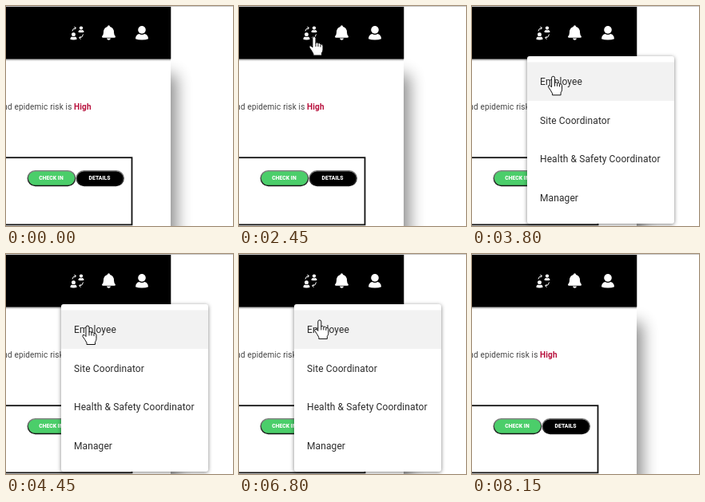
Write an HTML page that moves like this. It is 284 by 276 pixels and loops after 9150 ms.

```html
<!DOCTYPE html>
<html lang="en">
<meta charset="utf-8">
<title>Role menu</title>
<style>
  html, body { margin: 0; height: 100%; overflow: hidden; background: #fff }
  svg { display: block; font-family: Roboto, sans-serif }
  .copy { font-size: 10px; letter-spacing: .17px; fill: #444 }
  .copy .risk { font-weight: 700; fill: #b8103c }
  .pill { font-size: 6.8px; font-weight: 900; fill: #fff; text-anchor: middle }
  #menu { filter: drop-shadow(0 1px 2.5px rgba(0, 0, 0, .5)) }
  #items { font-size: 12px; letter-spacing: .1px; fill: #2b2b2b }
  .cursor { fill: #fff; stroke: #111; stroke-width: 1; stroke-linejoin: round }
</style>
<svg width="284" height="276" viewBox="0 0 284 276">
  <defs>
    <filter id="blur" x="-20%" y="-20%" width="140%" height="140%"><feGaussianBlur stdDeviation="10"/></filter>
    <linearGradient id="edge" x2="0" y2="1"><stop stop-color="#999"/><stop offset="1" stop-color="#fff"/></linearGradient>
    <linearGradient id="rim" x2="0" y2="1"><stop stop-color="#888"/><stop offset="1" stop-color="#111"/></linearGradient>
    <g id="person">
      <circle cy="-3.800" r="4.800"/>
      <path d="M-8 7.500Q-8 2.500-3.500 1.300Q0 3.500 3.500 1.300Q8 2.500 8 7.500Q5 8.800 0 8.800Q-5 8.800-8 7.500Z"/>
    </g>
  </defs>

  <rect x="-60" y="86" width="273" height="260" opacity=".46" filter="url(#blur)"/>
  <path d="M0 66H206V276H0Z" fill="#fff"/>
  <path d="M0 66H206V69.500H0Z" fill="url(#edge)"/>
  <path d="M0 1H206.300V66.500H0Z"/>
  <path d="M0 .5H284" stroke="#c8c8c8"/>

  <g fill="#fff">
    <use href="#person" transform="translate(84.500 37.800) scale(.52)"/>
    <use href="#person" transform="translate(94 29.300) scale(.45)"/>
    <g fill="none" stroke="#fff">
      <path d="M83 31.500Q83.500 28 87 27.500M85.500 26L87.500 27.500L86 29.500"/>
      <path d="M96.500 35.500Q96 39.500 92 40M93.500 38L91.500 40L93.500 41.500"/>
    </g>
    <path d="M128.500 24.300Q130 24.300 130.200 26Q135 27.500 135 33Q135 36.500 137 38.300Q137 39.800 135.500 39.800H121.500Q120 39.800 120 38.300Q122 36.500 122 33Q122 27.500 126.800 26Q127 24.300 128.500 24.300ZM126 40.500H131Q130.500 42.800 128.500 42.800Q126.500 42.800 126 40.500Z"/>
    <use href="#person" x="170" y="33.700"/>
  </g>

  <text class="copy" x="82.500" y="129.500" text-anchor="end">and epidemic risk is</text>
  <text class="copy" x="85" y="129.500"><tspan class="risk">High</tspan></text>

  <rect x="-10" y="190.200" width="167.500" height="84.200" fill="none" stroke="#111" stroke-width="1.800"/>
  <g stroke="url(#rim)" stroke-width="1.500">
    <rect x="27.200" y="206.700" width="59.500" height="18.800" rx="9.400" fill="#4bce6a"/>
    <rect x="88.200" y="206.700" width="59" height="18.800" rx="9.400"/>
  </g>
  <text class="pill" x="56.500" y="218.400">CHECK IN</text>
  <text class="pill" x="117" y="218.400">DETAILS</text>

  <g id="menu">
    <rect x="69" y="63" width="184" height="210" rx="3" fill="#fff"/>
    <rect id="hover" x="69" y="70.500" width="184" height="48.500" fill="#f2f2f2"/>
    <g id="items">
      <text x="85" y="99">Employee</text>
      <text x="85" y="147.500">Site Coordinator</text>
      <text x="85" y="196">Health &amp; Safety Coordinator</text>
      <text x="85" y="244.500">Manager</text>
    </g>
  </g>

  <path id="arrow" class="cursor" d="M0 0V15.500L3.600 12.300L6.200 18.500L8.800 17.400L6.200 11.300H11Z"/>
  <g id="hand" class="cursor">
    <path d="M-2 1.500Q-2-.5 0-.5Q2-.5 2 1.500V7.500Q3.500 6 5 8Q7 6.700 8 9Q10.500 8.300 11 11V16Q11 18 9.500 20V23H-1V21Q-3 17-6 13Q-6.500 10-4 11L-2 13Z"/>
    <path d="M2 7V12M5 8.500V12M8 9.500V12.500" fill="none"/>
  </g>
</svg>
<script>
  const LOOP = 9150, OPEN = 3000, CLOSE = 7284;
  // time, x, y of the pointer's hot spot
  const path = [
    [2200, 160, 290], [2450, 94, 39], [2600, 89, 38], [3400, 89, 38],
    [3850, 102, 90.5], [6700, 102, 90.5], [7150, 93, 35.5], [7700, 93, 35.5], [8050, 160, 290]
  ];
  const $ = id => document.getElementById(id);
  const ramp = (t, from, length) => Math.min(1, Math.max(0, (t - from) / length));
  const easeOut = (u, power) => 1 - (1 - u) ** power;
  const show = (id, visible) => $(id).style.display = visible ? '' : 'none';

  function pointerAt(t) {
    const next = path.findIndex(p => p[0] > t);
    if (next < 1) return [-50, -50];
    const [t0, x0, y0] = path[next - 1], [t1, x1, y1] = path[next];
    const u = ramp(t, t0, t1 - t0), k = u * u * (3 - 2 * u);
    return [x0 + (x1 - x0) * k, y0 + (y1 - y0) * k];
  }

  function draw(t) {
    const [x, y] = pointerAt(t);
    const isOpen = t >= OPEN && t < CLOSE;
    const onItem = isOpen && x > 69 && y > 70;
    const onIcon = Math.abs(x - 89) < 12 && Math.abs(y - 34) < 12;
    const onButton = x > 27 && x < 147 && y > 206 && y < 226;
    const isHand = isOpen ? onItem : onIcon || onButton;

    const grow = ramp(t, OPEN, 262), wide = easeOut(grow, 3), tall = easeOut(grow, 5);
    $('menu').setAttribute('transform', `translate(69 63) scale(${wide} ${tall}) translate(-69 -63)`);
    $('menu').style.opacity = wide * (1 - ramp(t, CLOSE, 100));
    $('items').style.opacity = ramp(t, OPEN + 150, 300);
    show('menu', t > OPEN && t < CLOSE + 100);
    show('hover', onItem);

    for (const id of ['arrow', 'hand']) {
      $(id).setAttribute('transform', `translate(${x} ${y})`);
      show(id, isHand === (id === 'hand'));
    }
  }

  function tick() {
    draw(performance.now() % LOOP);
    requestAnimationFrame(tick);
  }
  tick();
</script>
</html>
```
